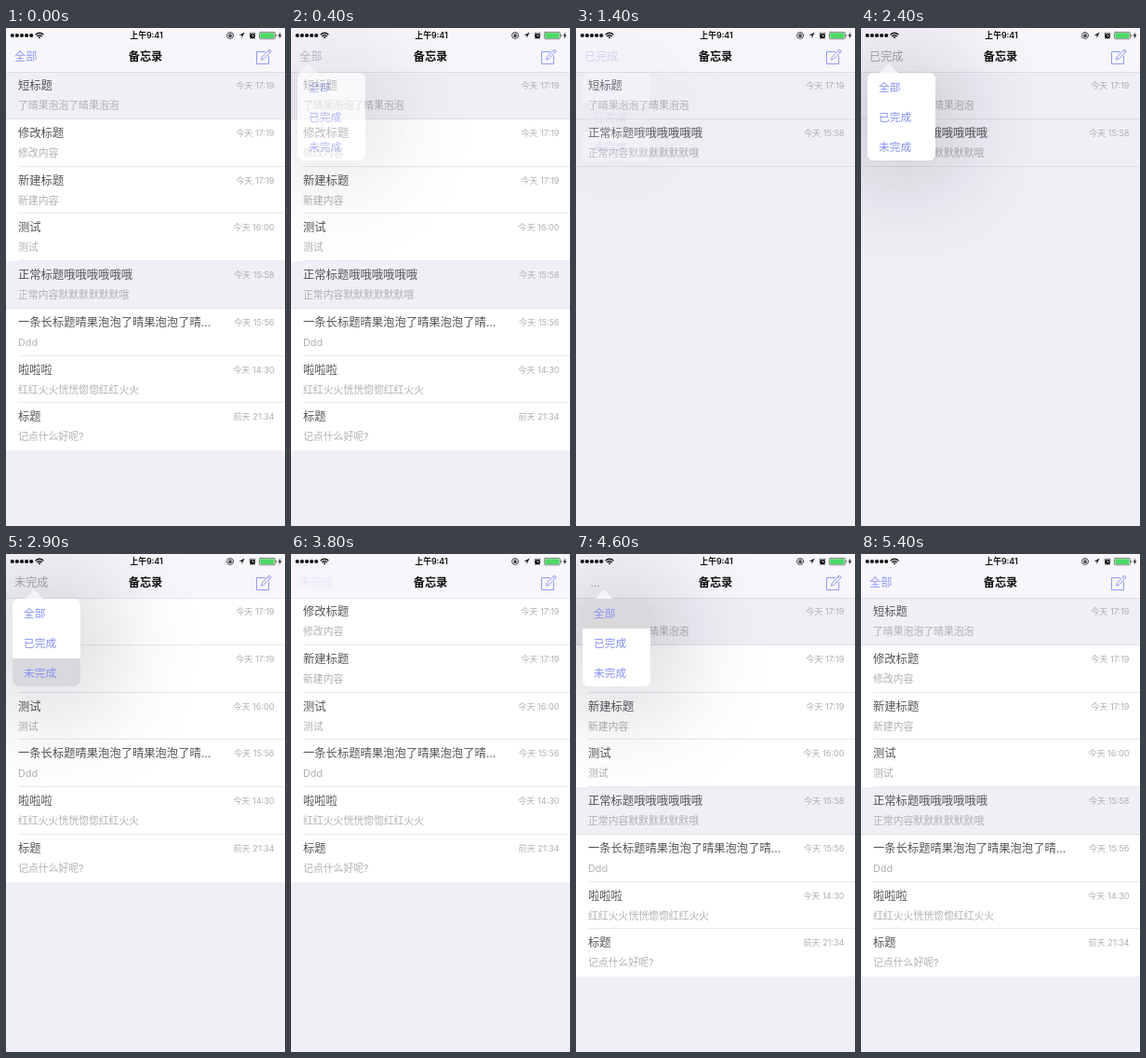
Animation, 300 px wide and 534 px high, one loop 6 s. Source, as an HTML page:

```html
<!DOCTYPE html>
<html lang="zh-CN">
<head>
<meta charset="utf-8">
<title>备忘录</title>
<style>
html, body { margin: 0; width: 100%; height: 100%; overflow: hidden; background: #f1eff6; }
body, #stage { font-family: Inter, "Noto Sans CJK SC", "Noto Sans CJK", "Noto Sans CJK JP", sans-serif; }
#stage { position: relative; width: 300px; height: 534px; overflow: hidden; background: #f1eff6; }
#stage div, #stage svg { position: absolute; }
.t { line-height: 20px; white-space: nowrap; }
#bar { left: 0; top: 0; width: 300px; height: 47px; background: #f8f6fb; box-shadow: 0 .5px 0 #cccad1; }
#bar svg { left: 0; top: 0; }
#clock { left: 101px; width: 100px; top: -2px; text-align: center; font-size: 8.8px; font-weight: 600; color: #111; }
#head { left: 100px; width: 100px; top: 21px; text-align: center; font-size: 12.2px; font-weight: 700; color: #111; }
#label { left: 9px; top: 21.4px; font-size: 12.2px; }
.row { left: 0; width: 300px; height: 50.75px; background: #fff; }
.row.done { background: #f1eff6; }
.row .line { left: 13px; right: 0; bottom: 0; height: 1px; background: #e9e8ed; }
.row.done .line { left: 0; background: #e0dee5; }
.row:not(.done):last-child .line { display: none; }
.name { left: 13px; top: 5px; font-size: 12.3px; color: #555458; }
.note { left: 13px; top: 26px; font-size: 10.85px; color: #b0afb4; }
.date { right: 11.5px; top: 5px; font-size: 9.1px; color: #b0afb4; }
#pop { left: 7px; top: 48px; width: 73px; height: 94px; border-radius: 7px; box-shadow: 0 0 120px rgba(16,8,28,.45); }
#menu { inset: 0; border-radius: 7px; overflow: hidden; background: #fff; }
.item { left: 0; width: 73px; height: 32px; }
.item .t { left: 12px; top: 6px; font-size: 11.7px; color: #8692f5; }
#arrow { top: -11px; }
</style>
</head>
<body>
<div id="stage">
  <div id="list"></div>
  <div id="bar">
    <svg width="300" height="47" viewBox="0 0 300 47" fill="none" stroke-linecap="round" stroke-linejoin="round">
      <g id="dots" fill="#111"></g>
      <g stroke="#111" stroke-width="1.4" stroke-linecap="butt">
        <path d="M31.6 7.2Q36 3.2 40.4 7.2M33.2 9Q36 6.4 38.8 9"/>
        <path d="M34.6 9.8Q36 8.8 37.4 9.8L36 11.4Z" fill="#111" stroke="none"/>
      </g>
      <g stroke="#222" stroke-width=".8">
        <circle cx="241" cy="8" r="3.5"/>
        <path d="M240 7.8V6.9a1 1 0 0 1 2 0V7.8"/>
        <path d="M239.5 7.6h3v2.2h-3z" fill="#222" stroke="none"/>
        <path d="M256.6 4.6L250.4 7.7H253.5V10.9Z" fill="#111" stroke="none"/>
        <circle cx="265" cy="8.4" r="3" fill="#111" stroke="none"/>
        <path d="M261.9 6L263.2 4.9M268.1 6L266.8 4.9M263.1 10.8L262.6 11.4M266.9 10.8L267.4 11.4"/>
        <path d="M265 6.8V8.5H266.3" stroke="#fff" stroke-width=".7"/>
        <rect x="272.4" y="4.4" width="17" height="7.4" rx="1.4" stroke="#555" stroke-width=".7"/>
        <rect x="273.3" y="5.3" width="15.2" height="5.6" rx=".7" fill="#4cd964" stroke="none"/>
        <path d="M290.4 6.8v2.6q1-.4 1-1.3t-1-1.3z" fill="#555" stroke="none"/>
        <path d="M295.2 4.6L292.6 8.5H294.3L293.6 11.6L296.4 7.4H294.6Z" fill="#111" stroke="none"/>
      </g>
      <g stroke="#8f9bf5" stroke-width="1">
        <path d="M278.5 25.5H269.5V38.5H282.5V30"/>
        <path d="M274.6 33.8L275.3 31.1L283.2 22.9L285.2 24.9L277.3 33.1ZM281.8 24.3L283.8 26.3"/>
      </g>
    </svg>
    <div id="clock" class="t">上午9:41</div>
    <div id="head" class="t">备忘录</div>
    <div id="label" class="t"></div>
  </div>
  <div id="pop">
    <svg id="arrow" width="26" height="12" viewBox="-13 0 26 12"><path d="M-12 12Q-9.5 11-7.5 9L-1.2 1.6Q0 .4 1.2 1.6L7.5 9Q9.5 11 12 12Z" fill="#f4f2f7"/></svg>
    <div id="menu"></div>
  </div>
</div>
<script>
const LOOP = 6000;
const ROW = 50.75;
const FILTERS = ['全部', '已完成', '未完成'];
const ALL = 0, DONE = 1, OPEN = 2;

const notes = [
  ['短标题', '了晴果泡泡了晴果泡泡', '今天 17:19', true],
  ['修改标题', '修改内容', '今天 17:19'],
  ['新建标题', '新建内容', '今天 17:19'],
  ['测试', '测试', '今天 16:00'],
  ['正常标题哦哦哦哦哦哦', '正常内容默默默默默默哦', '今天 15:58', true],
  ['一条长标题晴果泡泡了晴果泡泡了晴…', 'Ddd', '今天 15:56'],
  ['啦啦啦', '红红火火恍恍惚惚红红火火', '今天 14:30'],
  ['标题', '记点什么好呢?', '前天 21:34']
];

const BLUE = '#8f9bf8', PALE = '#e7e6f8', SOFT = '#d3d5f6', GRAY = '#a9a7ae', MID = '#bdbbcb';

// time, filter, label colour, popover opacity, selected item, waiting label
const steps = [
  [0, ALL, BLUE, 0],
  [200, ALL, PALE, 0],
  [400, ALL, MID, .6],
  [500, ALL, GRAY, 1],
  [1100, ALL, GRAY, 1, DONE],
  [1200, DONE, GRAY, .9, DONE, true],
  [1300, DONE, MID, .5, DONE],
  [1400, DONE, SOFT, .17, DONE],
  [1500, DONE, BLUE, .05, DONE],
  [1600, DONE, BLUE, 0],
  [2000, DONE, PALE, 0],
  [2100, DONE, MID, .6],
  [2200, DONE, MID, 1],
  [2400, DONE, GRAY, 1],
  [2800, DONE, GRAY, 1, OPEN],
  [2900, OPEN, GRAY, 1, OPEN],
  [3000, OPEN, GRAY, .85, OPEN],
  [3100, OPEN, MID, .5, OPEN],
  [3200, OPEN, SOFT, .17, OPEN],
  [3300, OPEN, BLUE, .05, OPEN],
  [3400, OPEN, BLUE, 0],
  [3800, OPEN, PALE, 0],
  [3900, OPEN, PALE, .2],
  [4000, OPEN, MID, .7],
  [4100, OPEN, GRAY, 1],
  [4600, ALL, GRAY, 1, ALL, true],
  [4700, ALL, GRAY, .85, ALL],
  [4800, ALL, MID, .5, ALL],
  [4900, ALL, SOFT, .17, ALL],
  [5000, ALL, BLUE, .05, ALL],
  [5100, ALL, BLUE, 0]
];

const $ = id => document.getElementById(id);
const [list, label, pop, menu, arrow] = ['list', 'label', 'pop', 'menu', 'arrow'].map($);

$('dots').innerHTML = [0, 1, 2, 3, 4]
  .map(i => `<circle cx="${6.8 + i * 5.1}" cy="8" r="2.1"/>`).join('');

menu.innerHTML = FILTERS
  .map((f, i) => `<div class="item" style="top:${i * 32}px"><div class="t">${f}</div></div>`).join('');

function rowHtml([name, note, date, done], i) {
  return `<div class="row${done ? ' done' : ''}" style="top:${47 + i * ROW}px">
    <div class="t name">${name}</div><div class="t note">${note}</div>
    <div class="t date">${date}</div><div class="line"></div></div>`;
}

const pages = FILTERS.map((_, f) => notes
  .filter(n => f === ALL || !!n[3] === (f === DONE)).map(rowHtml).join(''));

function arrowX(time) {
  return time < 2000 ? 18 : 29.5;
}

let shownStep, shownFilter;

function show(step) {
  if (step === shownStep) return;
  shownStep = step;
  const [time, filter, color, opacity, selected, waiting] = step;
  if (filter !== shownFilter) list.innerHTML = pages[shownFilter = filter];
  label.textContent = waiting ? '…' : FILTERS[filter];
  label.style.left = waiting ? '15.5px' : '9px';
  label.style.color = color;
  pop.style.opacity = opacity;
  arrow.style.left = arrowX(time) - 7 - 13 + 'px';
  [...menu.children].forEach((item, i) => {
    item.style.background = i === selected ? '#d9d8dc' : '#fff';
  });
}

function tick() {
  const now = performance.now() % LOOP;
  show(steps.findLast(s => s[0] <= now));
  requestAnimationFrame(tick);
}
tick();
</script>
</body>
</html>
```
